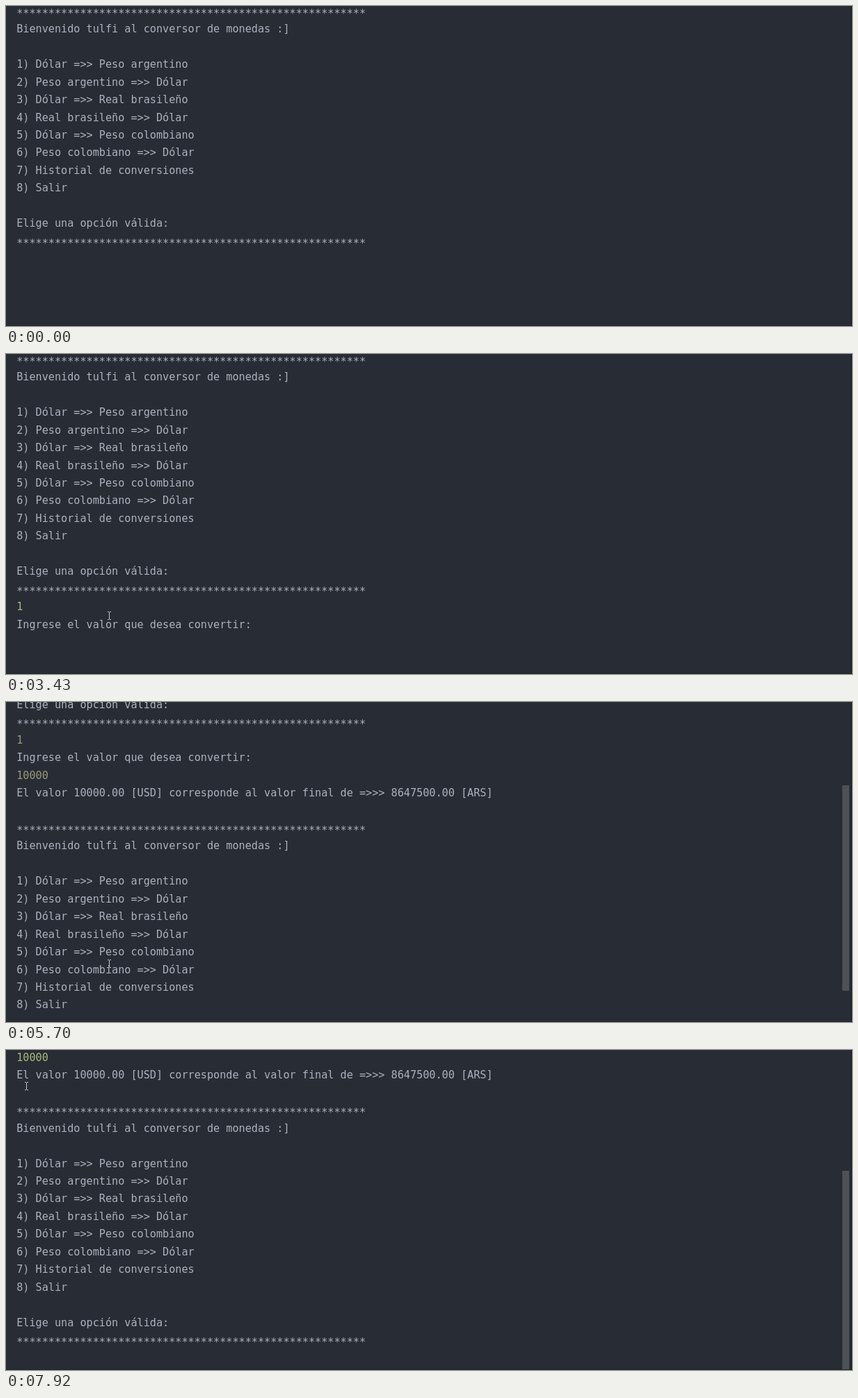
An HTML page with a canvas that plays this animation: 1216 by 461 pixels, repeating every 7.99 s.

```html
<!DOCTYPE html>
<html lang="es">
<head>
<meta charset="utf-8">
<title>Conversor de monedas</title>
<style>
  html, body { margin: 0; width: 100%; height: 100%; overflow: hidden; background: #282c34; }
  canvas { display: block; }
</style>
</head>
<body>
<canvas id="stage" width="1216" height="461"></canvas>
<script>
const ctx = document.getElementById('stage').getContext('2d');
const W = 1216, H = 461, LOOP = 7990;
const LEFT = 15.2, ADVANCE = 9.135, PITCH = 25.45, FIRST = 12.85;
const BG = '#282c34', EDGE = '#21252b', TEXT = '#abb2bf', CARET = '#528bff', BAR = '#4d5056';

const STARS = '*'.repeat(55);
const MENU = [
  STARS,
  'Bienvenido tulfi al conversor de monedas :]',
  '',
  '1) Dólar =>> Peso argentino',
  '2) Peso argentino =>> Dólar',
  '3) Dólar =>> Real brasileño',
  '4) Real brasileño =>> Dólar',
  '5) Dólar =>> Peso colombiano',
  '6) Peso colombiano =>> Dólar',
  '7) Historial de conversiones',
  '8) Salir',
  '',
  'Elige una opción válida:',
  STARS
];
const PROMPT = 'Ingrese el valor que desea convertir:';
const RESULT = 'El valor 10000.00 [USD] corresponde al valor final de =>>> 8647500.00 [ARS]';
const KEYS = [3830, 3960, 4160, 4690, 5020];
const ENTER = 5420, SCROLL = 5700, SETTLE = 5770;

// Caret: visible from, until, row, column
const CARETS = [
  [1010, 1420, 14, 0], [1950, 2350, 14, 0], [2350, 2620, 14, 1],
  [2620, 2820, 15, 0], [2820, 3430, 16, 0],
  ...KEYS.map((t, i) => [t, KEYS[i + 1] || ENTER, 16, i + 1]),
  [ENTER, SCROLL, 17, 0], [SETTLE, 6360, 33, 0], [7030, 7560, 33, 0]
];

// Pointer strokes: start, end, number of positions, Bezier points
const easeOut = s => 1 - (1 - s) ** 2;
const linear = s => s;
const MOVES = [
  { from: 250, to: 800, n: 9, ease: easeOut, x: [883, 600, 300, 154], y: [430, 350, 330, 380] },
  { from: 940, to: 941, n: 1, ease: linear, x: [148, 148, 148, 148], y: [377, 377, 377, 377] },
  { from: 6360, to: 6630, n: 5, ease: easeOut, x: [158, 190, 220, 238], y: [376, 372, 368, 367] },
  { from: 7030, to: 7780, n: 10, ease: linear, x: [246, 395, 300, 99], y: [365, 330, 140, 95] },
  { from: 7840, to: 7920, n: 2, ease: linear, x: [62, 50, 40, 29], y: [68, 62, 56, 52] }
];

const bezier = ([a, b, c, d], u) => {
  const v = 1 - u;
  return a * v * v * v + 3 * b * v * v * u + 3 * c * v * u * u + d * u * u * u;
};

function rect(color, x, y, w, h) {
  ctx.fillStyle = color;
  ctx.fillRect(x, y, w, h);
}

const scrollAt = t => t < SCROLL ? 0 : t < SETTLE ? 309.5 : 404.25;
const baseline = (row, scroll) => Math.round(FIRST + row * PITCH - scroll);

function drawLine(text, row, scroll, color = TEXT) {
  let y = baseline(row, scroll);
  if (!text || y < -10 || y > H + 20) return;
  if (text === STARS) y += 3;
  ctx.fillStyle = color;
  ctx.fillText(text, LEFT, y);
}

function drawConsole(t, scroll) {
  const input = t < SCROLL ? '#98c379' : t < SETTLE ? '#9a9a78' : '#a7ba7b';
  MENU.forEach((line, i) => drawLine(line, i, scroll));
  if (t >= 2350) drawLine('1', 14, scroll, input);
  if (t >= 2820) drawLine(PROMPT, 15, scroll);
  const typed = KEYS.filter(k => t >= k).length;
  drawLine('10000'.slice(0, typed), 16, scroll, input);
  if (t >= SCROLL) {
    drawLine(RESULT, 17, scroll);
    MENU.forEach((line, i) => drawLine(line, i + 19, scroll));
  }
}

function drawCaret(t, scroll) {
  const caret = CARETS.find(([on, off]) => t >= on && t < off);
  if (!caret) return;
  const [, , row, col] = caret;
  rect(CARET, 15.5 + col * ADVANCE, baseline(row, scroll) - 16, 2.2, 21);
}

function drawPointer(t) {
  const move = MOVES.filter(m => t >= m.from).pop();
  if (!move) return;
  const { from, to, n, ease } = move;
  const part = Math.min(1, (t - from) / (to - from));
  const u = n > 1 ? ease(Math.floor(part * (n - 1) + 1e-6) / (n - 1)) : 1;
  const x = Math.round(bezier(move.x, u)), y = Math.round(bezier(move.y, u));
  const ink = '#c3c7ce';
  rect(ink, x, y - 5, 1, 10);
  for (const dy of [-6, 5]) {
    rect(ink, x - 2, y + dy, 2, 1);
    rect(ink, x + 1, y + dy, 2, 1);
  }
}

function drawScrollbar(t) {
  if (t < SCROLL) return;
  const [top, bottom] = t < SETTLE ? [120, 416] : [174, H];
  rect(BAR, 1202, top, 10, bottom - top);
}

function draw(t) {
  rect(BG, 0, 0, W, H);
  const scroll = scrollAt(t);
  ctx.font = '15.174px "DejaVu Sans Mono", "Noto Sans Mono", monospace';
  ctx.textBaseline = 'alphabetic';
  drawConsole(t, scroll);
  drawCaret(t, scroll);
  drawScrollbar(t);
  rect(EDGE, 1214, 0, 2, H);
  rect(EDGE, 0, H - 1, W, 1);
  drawPointer(t);
}

const start = performance.now();
function tick() {
  draw((performance.now() - start) % LOOP);
  requestAnimationFrame(tick);
}
tick();
</script>
</body>
</html>
```
